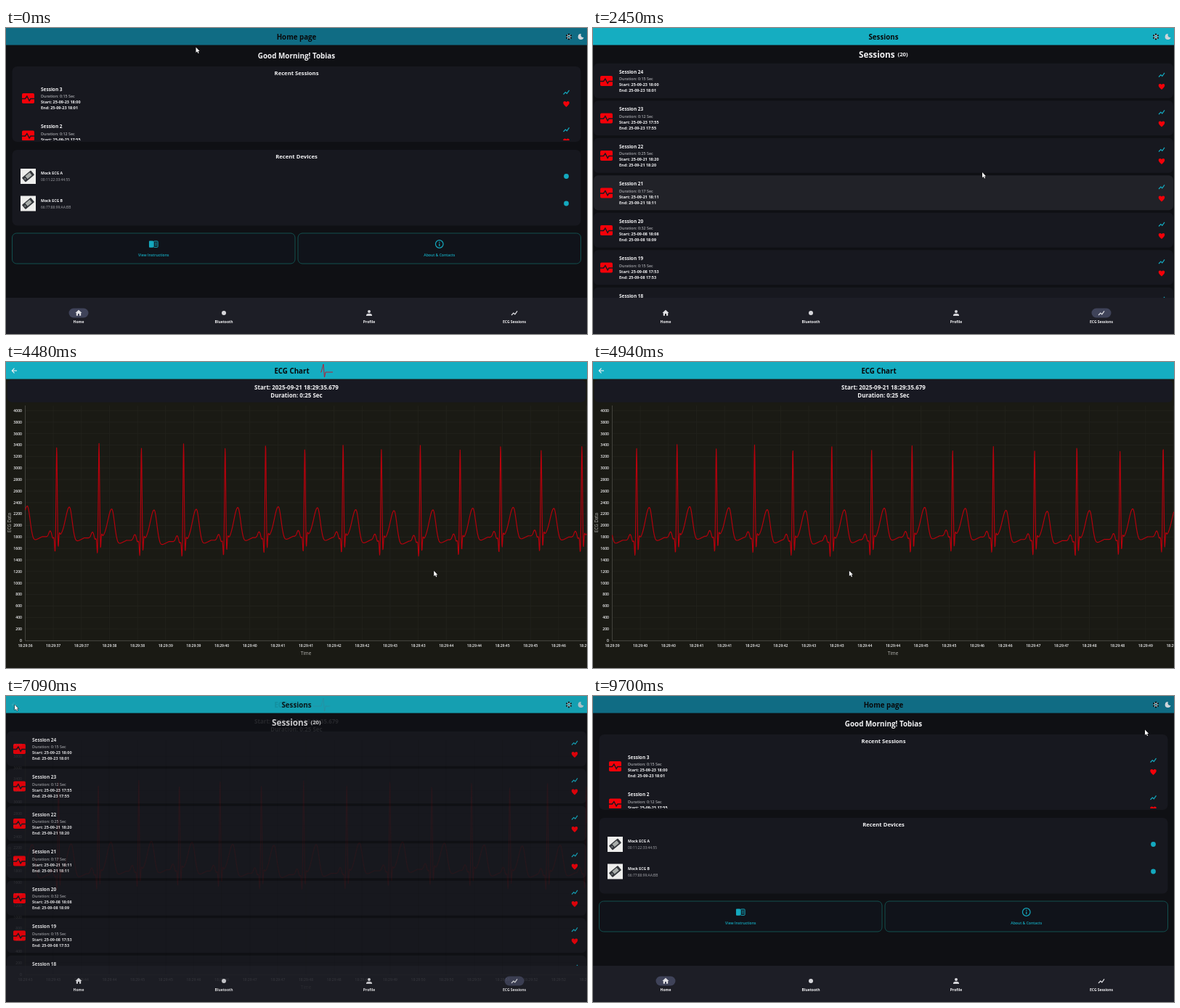
Animation of 800 by 422 pixels, one loop 9760 ms. Source, as an HTML page with a canvas:

```html
<!DOCTYPE html>
<html lang="en">
<head>
<meta charset="utf-8">
<title>ECG app tour</title>
<style>
html, body { margin: 0; width: 100%; height: 100%; overflow: hidden; background: #0f1014; }
canvas { display: block; width: 800px; height: 422px; }
</style>
</head>
<body>
<canvas id="stage" width="800" height="422"></canvas>
<script>
const c = document.getElementById('stage').getContext('2d');
const LOOP = 9760, CYAN = '#14a9bf', RED = '#f40009', TEAL = '#15adc1', WHITE = '#f2f2f4', CARD = '#17181f';
const SESSIONS_AT = 1500, CHART_AT = 3300, BACK_AT = 6850, HOME_AT = 8120;

const clamp = v => Math.max(0, Math.min(1, v));
const lerp = (a, b, k) => a + (b - a) * k;
const smooth = k => (k = clamp(k), k * k * (3 - 2 * k));
const ramp = (t, start, length) => clamp((t - start) / length);
const bell = (d, mid, width) => Math.exp(-(((d - mid) / width) ** 2) / 2);

// Two drags pull the chart left; the pointer travels with them
const drags = [
  { start: 4260, end: 4940, x: 669, y: 288, by: 321.5 },
  { start: 5350, end: 6000, x: 724, y: 282, by: 256.5 }];
const move = (start, end, x, y) => ({ start, end, x, y });
const moves = [
  move(0, 210, 440, 290),
  move(390, 820, 590, 312),
  move(1300, 1470, 700, 391),
  move(1800, 2450, 536, 199),
  move(2450, 3050, 782, 166),
  move(CHART_AT, 3790, 471, 273),
  ...drags.flatMap(({ start, end, x, y, by }) => [
    move(start - 440, start, x, y), move(start, end, x - by, y)]),
  move(6300, 6800, 12, 12),
  move(7200, 7790, 140, 392),
  move(8560, 9700, 760, 46.5)];

function pointerAt(t) {
  let x = 261.5, y = 26.5;
  for (const m of moves) {
    const k = smooth((t - m.start) / (m.end - m.start));
    x = lerp(x, m.x, k);
    y = lerp(y, m.y, k);
  }
  return [x, y];
}
const panAt = t => drags.reduce((sum, d) => sum + d.by * smooth((t - d.start) / (d.end - d.start)), 0);

const sessions = [
  ['0:15', '25-09-23', '18:00', '18:01'], ['0:12', '25-09-23', '17:55', '17:55'],
  ['0:25', '25-09-21', '18:20', '18:20'], ['0:17', '25-09-21', '18:11', '18:11'],
  ['0:32', '25-09-08', '18:08', '18:09'], ['0:15', '25-09-08', '17:53', '17:53'],
  ['0:15', '25-09-08', '17:53', '17:53']];

// Heart rate drifts slowly; spike and wave heights sway from beat to beat
function beat(i) {
  const sway = Math.cos(Math.PI * (i - 4) / 3);
  const drift = 5.7 + 6.1 * Math.cos(Math.PI * (i - 6.3) / 7);
  const flutter = i / 10 * (1 - Math.cos(2 * Math.PI * (i - 13.3) / 6.7));
  return {
    mid: 34.5 + 55.9 * i + drift - flutter,
    top: 114 + 0.35 * i + 3 * Math.cos(Math.PI * i),
    wave: 201 + 0.15 * i + 2.5 * sway,
    low: 250.5 - 0.1 * i + 3.5 * sway
  };
}
const beats = Array.from({ length: 30 }, (_, i) => beat(i));

function ecg(x) {
  let i = beats.length - 1;
  while (i > 0 && x < beats[i].mid - 14) i--;
  const { mid, top, wave, low } = beats[i], d = x - mid;
  const before = beat(i - 1).low - 6;
  const base = d < 26 ? lerp(before, low, smooth(d / 26)) : low - 6 * clamp((d - 26) / 12);
  return base - 8 * bell(d, -9, 1.8) + 3 * bell(d, -5.5, 0.9) + 24 * bell(d, -2.1, 0.7)
    + (top - base) * bell(d, 0, 0.8) + 19 * bell(d, 2, 0.6) - 4 * bell(d, 3.8, 0.7)
    + (wave - base) * bell(d, 17.5, d < 17.5 ? 5.6 : 3.8);
}

function text(s, x, y, size, color = WHITE, align = 'left', weight = 700) {
  c.font = `${weight} ${size}px "Open Sans", "Noto Sans", sans-serif`;
  c.textAlign = align;
  c.textBaseline = 'alphabetic';
  c.fillStyle = color;
  c.fillText(s, x, y + size * 0.36);
}
function box(x, y, w, h, r, fill, edge) {
  c.beginPath();
  c.roundRect(x, y, w, h, r);
  if (fill) { c.fillStyle = fill; c.fill(); }
  if (edge) { c.strokeStyle = edge; c.lineWidth = 1; c.stroke(); }
}
function dot(x, y, r, color) {
  c.beginPath();
  c.arc(x, y, r, 0, 7);
  c.fillStyle = color;
  c.fill();
}
function line(points, color, width = 1) {
  c.beginPath();
  points.forEach(p => c.lineTo(...p));
  c.strokeStyle = color;
  c.lineWidth = width;
  c.stroke();
}
function ring(r, color, width) {
  c.beginPath();
  c.arc(0, 0, r, 0, 7);
  c.strokeStyle = color;
  c.lineWidth = width;
  c.stroke();
}
function shape(d, color) {
  c.fillStyle = color;
  c.fill(new Path2D(d));
}
function at(x, y, draw, alpha = 1) {
  c.save();
  c.translate(x, y);
  c.globalAlpha *= alpha;
  draw();
  c.restore();
}
function clipped(x, y, w, h, draw) {
  c.save();
  c.beginPath();
  c.rect(x, y, w, h);
  c.clip();
  draw();
  c.restore();
}
// Fade in while sliding up
function enter(t, start, length, draw) {
  const k = ramp(t, start, length);
  if (k > 0) at(0, 11 * (1 - k), draw, k);
}

const trend = color => line([[-4, 3], [-1.2, 0], [0.8, 1.8], [4, -2.6]], color, 1.2);
const heart = () => shape('M0 4C-6 -.5-4.6-4-2.2-4Q-.8-4 0-2.7Q.8-4 2.2-4C4.6-4 6-.5 0 4Z', RED);
const icons = {
  house: () => shape('M0-4.2L4.5 0H3.2V3.8H1V1H-1V3.8H-3.2V0H-4.5Z', '#e2e2e6'),
  radio: () => dot(0, 0, 3, '#d6d6da'),
  person: () => { dot(0, -2, 2, '#d6d6da'); shape('M-4 4V2.8C-4 0 4 0 4 2.8V4Z', '#d6d6da'); },
  trend: () => trend('#e2e2e6')
};

function appBar(title, color, x = 400) {
  c.fillStyle = color;
  c.fillRect(0, 0, 800, 23.5);
  text(title, x, 12.5, 9.75, '#08090b', 'center');
}
function barTools() {
  at(775, 12, () => {
    ring(2.4, '#cfd5da', 1.7);
    for (let i = 0; i < 6; i++) {
      c.rotate(Math.PI / 3);
      c.fillRect(-1, -4.2, 2, 2);
    }
  });
  at(791.5, 12, () => shape('M.4-4A4 4 0 1 0 4 1A3.4 3.4 0 0 1 .4-4Z', '#cfd5da'));
}

function navBar(selected, since, hovered) {
  c.fillStyle = '#1d1e26';
  c.fillRect(0, 372, 800, 50);
  const items = [['Home', 'house'], ['Bluetooth', 'radio'], ['Profile', 'person'], ['ECG Sessions', 'trend']];
  items.forEach(([label, icon], i) => {
    const x = 100 + 200 * i;
    if (i === selected) {
      const w = 27 * smooth(since / 250);
      box(x - w / 2, 386.5, w, 13, 6.5, hovered ? '#5b5d66' : '#3f4359');
    }
    at(x, 393, icons[icon]);
    text(label, x, 405, 5, WHITE, 'center');
  });
}

function sessionRow(x, y, right, number, [length, day, start, end]) {
  text('Session ' + number, x, y, 6.5);
  text(`Duration: ${length} Sec`, x, y + 10, 5.4, '#a5a6ab', 'left', 600);
  text(`Start: ${day} ${start}`, x, y + 18, 5.5);
  text(`End: ${day} ${end}`, x, y + 25.7, 5.5);
  at(x - 17.5, y + 12.5, () => {
    box(-8.5, -7, 17, 14, 1.8, RED);
    line([[-9, 0.5], [-4, 0.5], [-1.6, -3], [1.6, 3.3], [3.4, 0.5], [9, 0.5]], CARD, 1.4);
  });
  at(right, y + 4, () => trend(CYAN));
  at(right, y + 20.5, heart);
}

function device(y, name, address) {
  box(20, y - 10.5, 21, 21, 0, '#eeeeec');
  at(30.5, y, () => {
    c.rotate(-0.7);
    box(-8, -4, 16, 8, 1, '#33363a');
    box(-3, -2.7, 8, 5, 0.5, '#a9adaa');
    dot(-5.5, 0, 1.1, '#85898c');
  });
  text(name, 48, y - 4, 5.2);
  text(address, 48, y + 5, 4.9, '#a5a6ab', 'left', 400);
  dot(771.5, y, 3.4, CYAN);
}

function button(x, label, [px, py], icon) {
  const w = 389.5, hovered = px > x && px < x + w && py > 283 && py < 325;
  box(x, 283, w, 42, 6, hovered ? '#171e25' : '#10131a', '#12504f');
  at(x + w / 2, 298, icon);
  text(label, x + w / 2, 313.5, 5.1, CYAN, 'center', 600);
}
function book() {
  box(-6.3, -4.5, 6, 9.3, 1, CYAN);
  box(0, -4, 5.8, 8.3, 0.8, null, CYAN);
  [-1.7, 0, 1.7].forEach(y => line([[1.5, y], [4.5, y]], CYAN, 0.8));
}
function info() {
  ring(5.3, CYAN, 1.2);
  line([[0, -0.8], [0, 3]], CYAN, 1.2);
  dot(0, -2.5, 0.8, CYAN);
}

function homePage(t, hover) {
  const begin = t < SESSIONS_AT ? -5000 : HOME_AT;
  appBar('Home page', '#106c84');
  barTools();
  text('Good Morning! Tobias', 400, 38, 9.9, WHITE, 'center');
  enter(t, begin, 540, () => {
    box(8.5, 53, 783, 104, 7, CARD);
    text('Recent Sessions', 400, 62.5, 7.7, WHITE, 'center');
    clipped(8, 53, 784, 102, () => {
      sessionRow(48, 84.5, 771.5, 3, sessions[0]);
      sessionRow(48, 136, 771.5, 2, sessions[1]);
    });
  });
  enter(t, begin + 190, 540, () => {
    box(8.5, 168, 783, 104.5, 7, CARD);
    text('Recent Devices', 400, 177.5, 7.7, WHITE, 'center');
    device(204.5, 'Mock ECG A', '00:11:22:33:44:55');
    device(242, 'Mock ECG B', '66:77:88:99:AA:BB');
  });
  enter(t, begin + 380, 540, () => {
    button(8.5, 'View Instructions', hover, book);
    button(402, 'About & Contacts', hover, info);
  });
  navBar(0, t - begin, hover[1] > 372);
}

function sessionsPage(t, [, hoverY]) {
  appBar('Sessions', TEAL);
  barTools();
  text('Sessions', 366, 36.5, 11.8);
  text('(20)', 419.5, 36, 7.8);
  sessions.forEach((s, i) => enter(t, SESSIONS_AT + 60 * i, 400, () => {
    const y = 48.7 + 51.5 * i, hovered = hoverY > y && hoverY < y + 48;
    box(1, y, 798, 48, 6, hovered ? '#212228' : CARD);
    sessionRow(36, y + 11.8, 783, 24 - i, s);
  }));
  navBar(3, t - SESSIONS_AT, false);
}

// Small trace that draws itself, then wipes away from the left
function pulse(t) {
  const phase = ((t - 3790) / 1500 + 10.23) % 1;
  const from = clamp(phase * 2 - 1), to = clamp(phase * 2);
  clipped(423 + 27 * from, 0, 27 * (to - from), 23, () =>
    line([[423, 14], [434, 14], [437, 3], [438.5, 21], [440, 14], [450, 14]], '#c4142a', 0.9));
}

function clock(seconds) {
  return '18:29:' + String(Math.floor(seconds)).padStart(2, '0');
}

function tooltip() {
  box(376, 200.5, 54, 19, 2, '#e9e5ea');
  shape('M400 219H406L403 222Z', '#e9e5ea');
  text('ECG Value', 403, 205.7, 4.3, '#45343f', 'center', 600);
  line([[378, 210], [428, 210]], '#b9b3ba', 0.7);
  dot(381, 214.5, 1.8, '#b0000c');
  text('1758504580947 : 2341', 384.5, 214.7, 4.15, '#625a64', 'left', 400);
}

function chartPage(t) {
  const pan = panAt(t);
  c.fillStyle = '#1a1a14';
  c.fillRect(0, 0, 800, 422);
  appBar('ECG Chart', TEAL, 393.5);
  line([[8, 12], [15, 12]], WHITE, 1.1);
  line([[11.5, 8.6], [8.3, 12], [11.5, 15.4]], WHITE, 1.1);
  pulse(t);

  const shown = ramp(t, 3410, 540);
  at(0, 2.5 * (1 - shown), () => {
    box(1.5, 24.5, 797, 31, 7, '#181922');
    text('Start: 2025-09-21 18:29:35.679', 400, 35, 8, WHITE, 'center');
    text('Duration: 0:25 Sec', 400, 46.3, 8, WHITE, 'center');
  }, shown);

  for (let i = 0; i <= 20; i++) {
    const x = 26.5 + 38.65 * i, y = 384 - 15.85 * i;
    line([[x, 60], [x, 384]], '#24241e', 0.8);
    line([[26, y], [800, y]], '#24241e', 0.8);
    text(clock(35.679 + pan / 77.3 + i / 2), x, 391.5, 5.05, WHITE, 'center', 600);
    text(200 * i, 22, y, 5.1, WHITE, 'right', 600);
  }
  line([[26.5, 60], [26.5, 384.5], [800, 384.5]], '#4c4c47', 0.8);
  text('Time', 413, 401.5, 6.3, '#b8b8b4', 'center', 400);
  at(5, 221.5, () => {
    c.rotate(-Math.PI / 2);
    text('ECG Data', 0, 0, 6.2, '#b8b8b4', 'center', 400);
  });

  const trace = [];
  for (let x = 26.5; x <= 800; x += 0.4) trace.push([x, ecg(x + pan)]);
  c.lineJoin = 'round';
  line(trace, '#b8000c', 1.15);
  if (t > 3650 && t < drags[0].start) tooltip();
}

function pointer([x, y]) {
  const hand = y > 372;
  at(x, y, () => {
    const d = hand
      ? 'M-1.6-4.5Q-.7-5.5 0-4.5V-1.3L3.3-.5Q4.2 0 4 1.3L3 5H-1L-3.6 1.3Q-3.4 0-1.6 1Z'
      : 'M0 0V7.4L1.7 5.8L3 8.6L4.2 8L2.9 5.4H5.2Z';
    c.strokeStyle = '#0a0a0c';
    c.lineWidth = 1;
    c.stroke(new Path2D(d));
    shape(d, '#fff');
  });
}

function draw(t) {
  const hover = pointerAt(t - 90); // highlights trail the pointer
  c.fillStyle = '#0f1014';
  c.fillRect(0, 0, 800, 422);
  if (t < SESSIONS_AT || t >= HOME_AT) homePage(t, hover);
  else sessionsPage(t, hover);
  const chart = smooth(ramp(t, CHART_AT, 300)) * (1 - smooth(ramp(t, BACK_AT, 300)));
  if (chart > 0) at(0, 0, () => chartPage(t), chart);
  pointer(pointerAt(t));
}

const began = performance.now();
function frame() {
  draw((performance.now() - began) % LOOP);
  requestAnimationFrame(frame);
}
frame();
</script>
</body>
</html>
```
